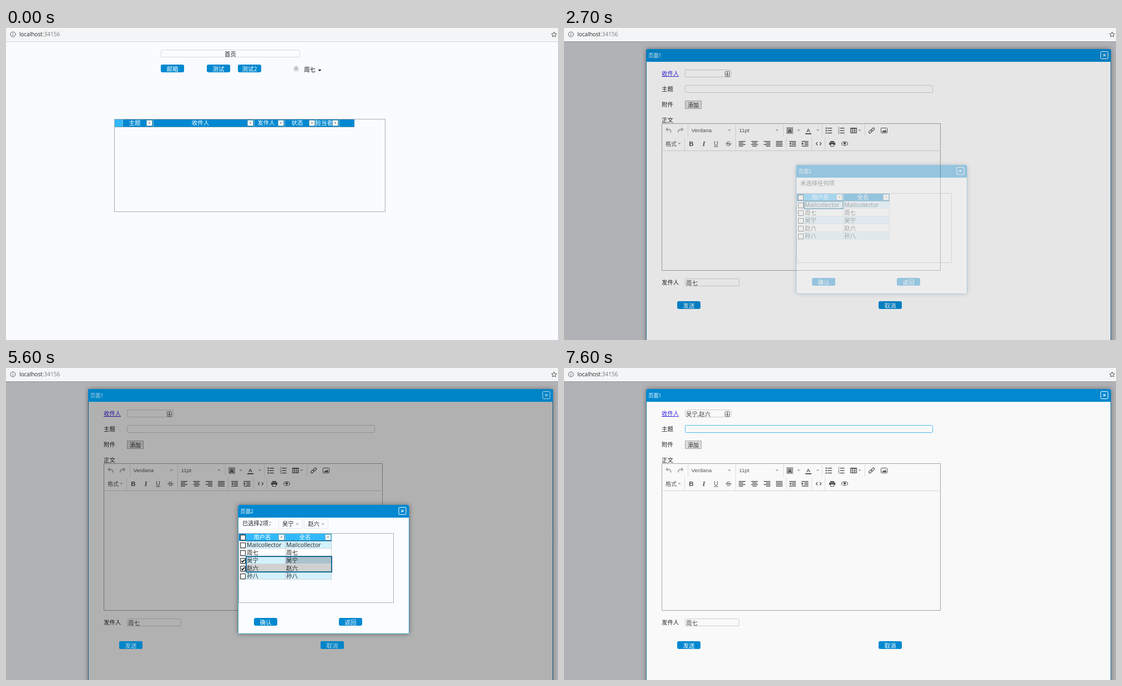
Animation, 995 px wide and 563 px high, one loop 8 s. Source, as an HTML page with a canvas:

```html
<!DOCTYPE html>
<html lang="zh-CN">
<head>
<meta charset="utf-8">
<title>页面</title>
<style>
html, body { margin: 0; width: 100%; height: 100%; overflow: hidden; background: #f9fbfe; }
canvas { display: block; }
</style>
</head>
<body>
<canvas id="stage" width="995" height="563"></canvas>
<script>
const W = 995, H = 563, LOOP = 8000;
const UI = '"Open Sans", "Noto Sans CJK SC", "Noto Sans CJK", sans-serif';
const ARIAL = '"Liberation Sans", "Noto Sans CJK SC", sans-serif';
const BLUE = '#0088d0', BRIGHT = '#31b9fb', INK = '#222', ICON = '#505050';
const USERS = ['Mailcollector', '周七', '吴宁', '赵六', '孙八'];
const ME = USERS[1], PICKS = [USERS[2], USERS[3]];

const main = document.getElementById('stage').getContext('2d');
const spare = document.createElement('canvas');
spare.width = W; spare.height = H;
const off = spare.getContext('2d');
let c = main;

function fill(x, y, w, h, color) {
  c.fillStyle = color;
  c.fillRect(x, y, w, h);
}

function round(x, y, w, h, r) {
  c.beginPath();
  c.roundRect(x, y, w, h, r);
}

function box(x, y, w, h, color, r = 0, bg) {
  round(x + .5, y + .5, w - 1, h - 1, r);
  if (bg) { c.fillStyle = bg; c.fill(); }
  c.strokeStyle = color;
  c.lineWidth = 1;
  c.stroke();
}

function text(s, x, y, size = 10.4, color = INK, align = 'left', font = UI, style = '') {
  c.font = `${style} ${size}px ${font}`;
  c.textAlign = align;
  c.fillStyle = color;
  c.fillText(s, x, y);
}

// Polyline through x,y pairs
function path(pts, color = ICON, width = 1) {
  c.beginPath();
  for (let i = 0; i < pts.length; i += 2) c.lineTo(pts[i], pts[i + 1]);
  c.strokeStyle = color;
  c.lineWidth = width;
  c.stroke();
}

function arrow(x, y, color = '#999', w = 3) {
  c.beginPath();
  c.moveTo(x - w, y); c.lineTo(x + w, y); c.lineTo(x, y + w);
  c.fillStyle = color;
  c.fill();
}

function ring(x, y, r, color = ICON, from = 0, to = Math.PI * 2, width = 1) {
  c.beginPath();
  c.arc(x, y, r, from, to);
  c.strokeStyle = color;
  c.lineWidth = width;
  c.stroke();
}

function dot(x, y, r, color) {
  c.beginPath();
  c.arc(x, y, r, 0, Math.PI * 2);
  c.fillStyle = color;
  c.fill();
}

function button(label, x, y, bg = BLUE, color = '#fff') {
  round(x, y, 42, 14, 3);
  c.fillStyle = bg;
  c.fill();
  text(label, x + 21, y + 12, 10.5, color, 'center');
}

function filterButton(x, y) {
  box(x, y, 11, 11, '#8aa', 0, '#fff');
  arrow(x + 5.5, y + 4.5, '#555', 2);
}

function closeBox(x, y, color) {
  box(x, y, 14, 14, color, 1);
  path([x + 4.8, y + 4.8, x + 9.2, y + 9.2], color, 1.1);
  path([x + 9.2, y + 4.8, x + 4.8, y + 9.2], color, 1.1);
}

function titleBar(label, x, y, w, bg = BLUE, color = '#fff') {
  round(x, y, w, 23, [3, 3, 0, 0]);
  c.fillStyle = bg;
  c.fill();
  text(label, x + 4, y + 15, 9.2, color);
  closeBox(x + w - 19, y + 4.5 | 0, color);
}

function layer(alpha, draw) {
  c = off;
  c.clearRect(0, 0, W, H);
  draw();
  c = main;
  c.globalAlpha = alpha;
  c.drawImage(spare, 0, 0);
  c.globalAlpha = 1;
}

function addressBar() {
  fill(0, 0, W, 24, '#f8f9fa');
  fill(0, 1, W, 21, '#f3f5f6');
  ring(12.5, 11.5, 4.5, '#555');
  fill(12, 11, 1, 3, '#555');
  fill(12, 9, 1, 1, '#555');
  text('localhost', 24, 15, 10, '#2a2a2a');
  const w = c.measureText('localhost').width;
  text(':34156', 24 + w, 15, 10, '#777');
  c.beginPath();
  for (let i = 0; i < 10; i++) {
    const a = i * Math.PI / 5 - Math.PI / 2, r = i % 2 ? 2.3 : 5;
    c.lineTo(988 + r * Math.cos(a), 12 + r * Math.sin(a));
  }
  c.closePath();
  c.strokeStyle = '#555';
  c.lineWidth = 1;
  c.stroke();
}

function home(t) {
  fill(0, 0, W, H, '#f9fbfe');
  fill(0, 24, W, 1, '#cfd1d3');
  box(279, 39, 251, 14, '#d6d8da', 2);
  text('首页', 404.5, 51, 10.4, INK, 'center');
  if (t >= 1200) {
    round(278, 65.2, 44, 16, 4);
    c.fillStyle = t < 1300 ? '#8fcdf0' : '#bfe3f7';
    c.fill();
  }
  button('邮箱', 279, 66, t < 1100 || t >= 1300 ? BLUE : t < 1200 ? '#1a9ade' : '#007abb');
  button('测试', 362, 66);
  button('测试2', 418, 66);
  dot(523, 73.5, 5.5, '#e6e7e8');
  ring(523, 72, 1.7, '#888', 0, 7, .8);
  ring(523, 77, 3, '#888', Math.PI, Math.PI * 2, .8);
  text(ME, 537, 79, 10.6, '#111');
  arrow(565.5, 75, '#111');

  fill(196, 165, 432, 14, BLUE);
  fill(196, 165, 14, 14, BRIGHT);
  fill(196, 178, 432, 1, '#5a94b4');
  for (const x of [210, 265, 447, 502, 558, 600]) fill(x, 165, 1, 14, '#86b8d2');
  for (const x of [253, 435, 490, 546, 588]) filterButton(x, 166);
  const heads = [['主题', 232], ['收件人', 350.5], ['发件人', 469], ['状态', 525], ['担当者', 573]];
  for (const [s, x] of heads) text(s, x, 175, 10.5, '#fff', 'center');
  box(195, 164, 489, 168, '#a9abad');
}

function lines(x, y, widths, step, dx = () => 0) {
  widths.forEach((w, i) => fill(x + dx(i, w), y + i * step, w, 1.4, ICON));
}

function toolbar() {
  for (const x of [223, 309, 395, 465, 542]) fill(x, 174, 1, 22, '#dcdcdc');
  for (const x of [217, 309, 400, 446, 470]) fill(x, 197, 1, 23, '#dcdcdc');
  fill(178, 221, 501, 1, '#d2d2d2');

  for (const [x, s] of [[188, 1], [210.5, -1]]) {
    c.beginPath();
    c.moveTo(x - 5 * s, 183); c.lineTo(x - s, 179); c.lineTo(x - s, 187);
    c.fillStyle = '#aaa';
    c.fill();
    c.beginPath();
    c.moveTo(x - s, 183);
    c.quadraticCurveTo(x + 5 * s, 182.5, x + 4.5 * s, 188.5);
    c.strokeStyle = '#aaa';
    c.lineWidth = 2;
    c.stroke();
  }
  text('Verdana', 229.5, 188, 9.9, '#555', 'left', ARIAL);
  text('11pt', 315.5, 188, 9.9, '#555', 'left', ARIAL);
  text('格式', 183, 212.5, 10, '#555');
  for (const x of [298, 384, 423, 457.5, 533]) arrow(x, 183.5, '#999', 2.6);
  arrow(208, 207.5, '#999', 2.6);

  fill(401, 179, 12, 12, '#a3a3a3');
  text('A', 407, 188.5, 9.5, '#333', 'center', ARIAL, 'bold');
  text('A', 440.5, 188, 9.5, ICON, 'center', ARIAL, 'bold');
  fill(435, 190, 11, 1.5, '#222');

  lines(475, 180, [8, 8, 8], 4.4);
  lines(497.5, 180, [8, 8, 8], 4.4);
  for (let i = 0; i < 3; i++) {
    dot(472.7, 180.7 + i * 4.4, 1.3, ICON);
    text(i + 1, 495.3, 182.3 + i * 4.4, 4.5, ICON, 'center', ARIAL);
  }
  box(516, 180, 12, 10, ICON);
  fill(516, 180, 12, 2, ICON);
  for (const x of [519.5, 523.5]) fill(x, 181, 1, 9, ICON);
  for (const y of [184, 187]) fill(517, y, 10, .8, ICON);

  for (const [x, y] of [[552.2, 187], [556.8, 183]]) {
    c.save();
    c.translate(x, y);
    c.rotate(-.75);
    round(-3.2, -1.8, 6.4, 3.6, 1.8);
    c.strokeStyle = ICON;
    c.lineWidth = 1.2;
    c.stroke();
    c.restore();
  }
  box(571, 180, 12, 10, ICON, 1);
  c.beginPath();
  [573, 188, 575.5, 184.5, 577, 186, 579, 183, 581.5, 188].forEach((v, i, a) => { if (i % 2 === 0) c.lineTo(v, a[i + 1]); });
  c.fillStyle = ICON;
  c.fill();

  text('B', 229.5, 213, 11.5, ICON, 'center', ARIAL, 'bold');
  text('I', 252, 213, 12, ICON, 'center', '"Liberation Serif", serif', 'italic bold');
  text('U', 274, 212, 10.5, ICON, 'center', ARIAL);
  fill(270, 213.4, 8, 1, ICON);
  text('S', 296.5, 213, 11, ICON, 'center', ARIAL);
  fill(291, 208.5, 11, 1, ICON);

  const rag = [12, 8, 12, 8];
  lines(315, 204, rag, 2.8);
  lines(337.5, 204, rag, 2.8, (i, w) => (12 - w) / 2);
  lines(360, 204, rag, 2.8, (i, w) => 12 - w);
  lines(382, 204, [12, 12, 12, 12], 2.8);
  for (const [x, s] of [[406, -1], [428.5, 1]]) {
    lines(x, 204, [12, 7, 7, 12], 2.8, (i, w) => 12 - w);
    c.beginPath();
    const a = s > 0 ? x : x + 3.5;
    c.moveTo(a, 206); c.lineTo(a + 3.5 * s, 208.8); c.lineTo(a, 211.5);
    c.fillStyle = ICON;
    c.fill();
  }
  path([457, 206, 454.5, 208.7, 457, 211.5], ICON, 1.2);
  path([461, 206, 463.5, 208.7, 461, 211.5], ICON, 1.2);
  fill(480, 204, 7, 2, ICON);
  fill(478, 206.5, 11, 4.5, ICON);
  box(480, 209, 7, 5, ICON, 0, '#f9f9f9');
  c.beginPath();
  c.ellipse(506, 208.7, 5.5, 3.4, 0, 0, 7);
  c.strokeStyle = ICON;
  c.lineWidth = 1.1;
  c.stroke();
  dot(506, 208.3, 2.1, ICON);
}

function dialogBlues(bg, color) {
  titleBar('页面1', 148, 38, 838, bg, color);
  button('发送', 204, 493, bg, color);
  button('取消', 567, 493, bg, color);
}

function dialog(t) {
  c.save();
  c.shadowColor = 'rgba(0,0,0,.4)';
  c.shadowBlur = 9;
  round(148, 38, 838, 560, 3);
  c.fillStyle = '#f9f9f9';
  c.fill();
  c.restore();
  box(148, 38, 838, 560, '#2a86b8', 3);
  dialogBlues(BLUE, '#fff');

  text('收件人', 176, 86, 10.4, '#3527e0');
  fill(176, 87, 31, 1, '#3527e0');
  text('主题', 176, 114);
  text('附件', 176, 142);
  text('正文', 176, 170);
  text('发件人', 176, 463);

  box(218, 75, 84, 14, '#cdcdcd', 2);
  if (t >= 6500) text(PICKS.join(','), 220, 87, 10.4, '#444');
  if (t >= 2000) {
    box(290, 78, 9, 10, '#666', 1);
    dot(294.5, 81.5, 1.2, '#555');
    fill(292.5, 83.5, 4, 2, '#555');
  }
  const focus = t >= 7200;
  box(218, 103, 447, 14, focus ? '#4cb9ee' : '#cdcdcd', 2);
  if (focus && t < 7600) fill(220, 104, 1, 12, '#222');
  box(218, 131, 30, 15, '#a6a6a6', 0, '#dedede');
  text('添加', 233, 142.5, 9.8, INK, 'center');

  box(176, 172, 503, 266, '#a2a2a2');
  toolbar();
  box(218, 452, 98, 14, '#cdcdcd', 2);
  text(ME, 220, 464, 10.5, '#444');
}

function checkbox(y, on) {
  box(422, y, 10, 10, '#222', 0, '#fff');
  if (on) path([424.3, y + 5, 426.3, y + 7.2, 430, y + 2.8], '#000', 1.7);
}

function popup(picked, pressed) {
  c.save();
  c.shadowColor = 'rgba(0,0,0,.4)';
  c.shadowBlur = 9;
  round(418, 247, 309, 233, 3);
  c.fillStyle = '#fafcff';
  c.fill();
  c.restore();
  box(418, 247, 309, 233, '#3d9bcb', 3);
  titleBar('页面2', 418.5, 247, 308);

  text(picked ? `已选择${picked}项：` : '未选择任何项', 426, 284, 10.3);
  for (let i = 0; i < picked; i++) {
    const x = 491 + i * 46.5;
    box(x | 0, 272, 44, 18, '#e6e9ec', 2);
    text(PICKS[i], x + 7, 284.5, 10.3);
    path([x + 32, 279.5, x + 36, 283.5], '#999');
    path([x + 36, 279.5, x + 32, 283.5], '#999');
  }

  fill(420, 298, 167, 14, BLUE);
  fill(432, 298, picked ? 155 : 71, 14, BRIGHT);
  fill(503, 298, 1, 14, '#86b8d2');
  text('用户名', 462, 309, 10.5, '#fff', 'center');
  text('全名', 539, 309, 10.5, '#fff', 'center');
  filterButton(491, 300);
  filterButton(575, 300);
  checkbox(301, false);

  USERS.forEach((name, i) => {
    const y = 312 + i * 14, on = i > 1 && i < 2 + picked;
    fill(420, y, 167, 14, i % 2 ? '#fff' : '#d3f0fd');
    fill(420, y, 12, 14, '#fafcff');
    if (on) {
      if (i > 2) fill(432, y, 71, 14, '#d0d0d0');
      fill(503, y, 84, 14, i > 2 ? '#d0d0d0' : '#a9c1cb');
    }
    fill(420, y + 13, 167, 1, '#d3d8da');
    fill(503, y, 1, 14, '#c8cdd0');
    fill(586, y, 1, 14, '#c8cdd0');
    checkbox(y + 3, on);
    text(name, 434, y + 10.5, 10.5);
    text(name, 505, y + 10.5, 10.5);
  });
  fill(picked ? 432 : 420, 311, picked ? 155 : 167, 1.5, '#0a6a9c');
  c.strokeStyle = '#17698f';
  c.lineWidth = 2;
  if (picked) c.strokeRect(433, 340, 154, 14 * picked);
  else c.strokeRect(433, 312.5, 70, 13.5);
  box(419, 298, 280, 126, '#aeb0b2');

  button('确认', 447, 451, pressed ? '#0a78b8' : BLUE);
  button('返回', 600, 451);
}

function emptyPopup() {
  c.save();
  c.shadowColor = 'rgba(0,100,160,.5)';
  c.shadowBlur = 5;
  box(418, 247, 309, 233, '#3d9bcb', 3);
  c.restore();
}

function shade(x, y, alpha) {
  fill(x, y, x ? 838 : W, H - y, `rgba(0,0,0,${alpha})`);
}

function draw(t) {
  home(t);
  addressBar();
  if (t < 1500) return;
  const opening = t < 1600;
  shade(0, 24, opening ? .19 : .29);
  layer(opening ? .7 : 1, () => dialog(t));
  addressBar();
  if (t < 2700 || t >= 6700) return;

  if (t < 2800 || t >= 6600) shade(148, 38, .08);
  else if (t >= 6500) shade(148, 38, .2);
  else {
    shade(148, 38, .29);
    dialogBlues('#0084c8', '#bcd6e4');
  }
  if (t >= 6500) layer(t < 6600 ? .7 : .33, emptyPopup);
  else layer(t < 2800 ? .35 : 1, () => popup(t < 4100 ? 0 : t < 5600 ? 1 : 2, t >= 6300));
}

function tick() {
  draw(performance.now() % LOOP);
  requestAnimationFrame(tick);
}
tick();
</script>
</body>
</html>
```
